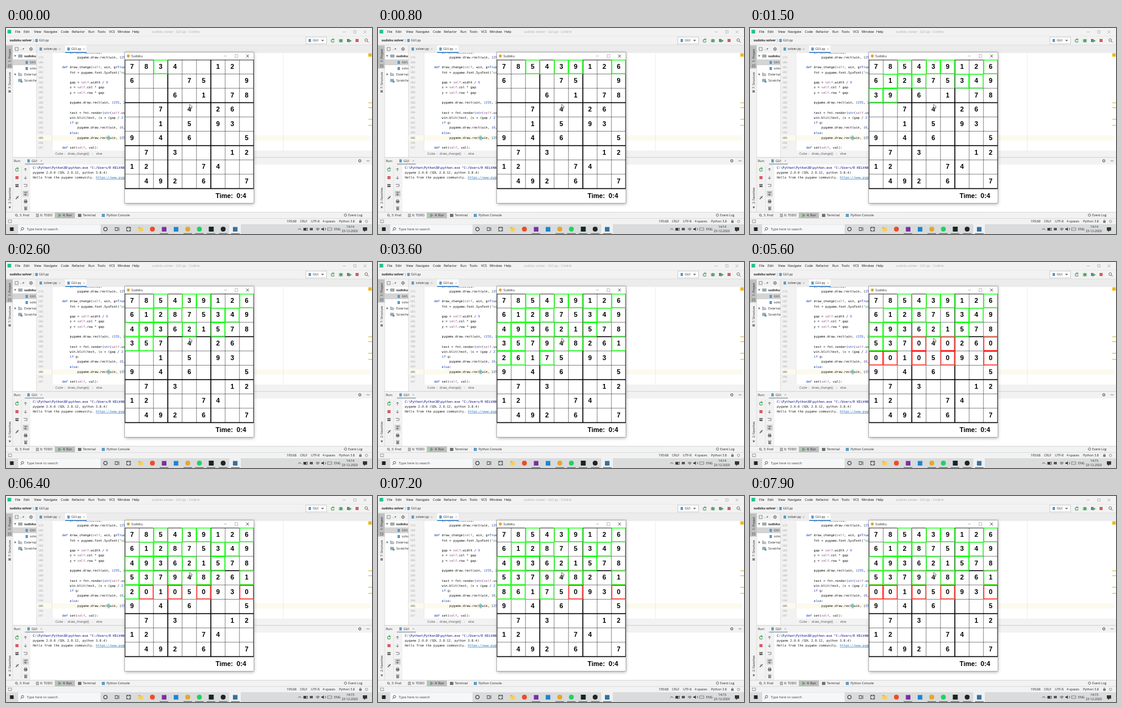
An HTML page with a canvas for the animation above (8000 ms loop, 600 px wide and 338 px high).

```html
<!DOCTYPE html>
<html>
<head>
<meta charset="utf-8">
<style>
html, body { margin: 0; width: 100%; height: 100%; overflow: hidden; background: #f2f2f2; }
canvas { display: block; }
</style>
</head>
<body>
<canvas id="stage" width="600" height="338"></canvas>
<script>
const ctx = document.getElementById('stage').getContext('2d');
const UI = '"Open Sans", sans-serif', MONO = '"DejaVu Sans Mono", monospace', BOARD = '"Liberation Sans", sans-serif';
const STEP = 100, LOOP = 8000, CHAR = 3.13;

// Backtracking solver: record every placement and removal.
const puzzle = [...'780400120600075009000601078007040260001050930904060005070300012120007400049206007'].map(Number);
const moves = [];
const cells = puzzle.slice();

function fits(k, v) {
  const r = k / 9 | 0, c = k % 9;
  return cells.every((n, i) => {
    const y = i / 9 | 0, x = i % 9;
    const peer = y === r || x === c || ((y / 3 | 0) === (r / 3 | 0) && (x / 3 | 0) === (c / 3 | 0));
    return n !== v || !peer;
  });
}

function solve() {
  const k = cells.indexOf(0);
  if (k < 0 || moves.length >= 80) return true;
  for (let v = 1; v <= 9; v++) {
    if (!fits(k, v)) continue;
    cells[k] = v;
    moves.push([k, v]);
    if (solve()) return true;
    cells[k] = 0;
    moves.push([k, 0]);
  }
  return false;
}
solve();

function box(x, y, w, h, color) {
  ctx.fillStyle = color;
  ctx.fillRect(x, y, w, h);
}
function frame(x, y, w, h, color, width = 1) {
  ctx.strokeStyle = color;
  ctx.lineWidth = width;
  ctx.strokeRect(x, y, w, h);
}
function dot(x, y, r, color) {
  ctx.fillStyle = color;
  ctx.beginPath();
  ctx.arc(x, y, r, 0, 7);
  ctx.fill();
}
function ring(x, y, r, color, width = 0.9, start = 0, end = 7) {
  ctx.strokeStyle = color;
  ctx.lineWidth = width;
  ctx.beginPath();
  ctx.arc(x, y, r, start, end);
  ctx.stroke();
}
function path(points, color, width = 0.8) {
  ctx.strokeStyle = color;
  ctx.lineWidth = width;
  ctx.beginPath();
  for (let i = 0; i < points.length; i += 2) ctx.lineTo(points[i], points[i + 1]);
  ctx.stroke();
}
function shape(points, color) {
  ctx.fillStyle = color;
  ctx.beginPath();
  for (let i = 0; i < points.length; i += 2) ctx.lineTo(points[i], points[i + 1]);
  ctx.fill();
}
// y is the middle of the capitals
function text(s, x, y, { size = 5.2, color = '#222', font = UI, weight = 400, align = 'left' } = {}) {
  ctx.font = `${weight} ${size}px ${font}`;
  ctx.fillStyle = color;
  ctx.textAlign = align;
  ctx.fillText(s, x, y + size * 0.36);
}
function upright(s, y) {
  ctx.save();
  ctx.translate(6, y);
  ctx.rotate(-Math.PI / 2);
  text(s, 0, 0, { size: 5, align: 'center' });
  ctx.restore();
}
function cross(x, y, r, color, width) {
  path([x - r, y - r, x + r, y + r], color, width);
  path([x + r, y - r, x - r, y + r], color, width);
}
function play(x, y, color) {
  shape([x - 2.2, y - 3, x + 3, y, x - 2.2, y + 3], color);
}
function rerun(x, y) {
  ring(x, y, 2.4, '#59a869', 1.1, 0, 5);
  shape([x, y - 4.5, x + 3.5, y - 2, x, y - 0.5], '#59a869');
}
function gear(x, y) {
  ring(x, y, 1.8, '#6e6e6e', 1.3);
}
function fileIcon(x, y) {
  box(x - 2, y - 2.5, 4, 5, '#5c9bc4');
}

const code = {
  178: '        if self.selected:',
  179: '            pygame.draw.rect(win, (255, 0',
  181: '    def draw_change(self, win, g=True):',
  182: '        fnt = pygame.font.SysFont("comicsans"',
  184: '        gap = self.width / 9',
  185: '        x = self.col * gap',
  186: '        y = self.row * gap',
  188: '        pygame.draw.rect(win, (255, 255',
  190: '        text = fnt.render(str(self.value)',
  191: '        win.blit(text, (x + (gap / 2 - ',
  192: '        if g:',
  193: '            pygame.draw.rect(win, (0, 255',
  194: '        else:',
  195: '            pygame.draw.rect(win, (255, 0',
  197: '    def set(self, val):'
};
const tokens = /"\w*"?|\b(?:def|if|else|True|str)\b|\bself\b|\b\d+\b|\s+|\w+|./g;

function tokenColor(t) {
  if (t[0] === '"') return '#067d17';
  if (/^(def|if|else|True|str)$/.test(t)) return '#0033b3';
  if (t === 'self') return '#94558d';
  return /^\d/.test(t) ? '#1750eb' : '#111';
}

function drawEditor() {
  box(50, 41, 550, 160, '#fff');
  box(50, 41, 25, 160, '#f2f2f2');
  box(50, 176, 547, 8.5, '#fcfaed');
  path([75.5, 41, 75.5, 201], '#dcdcdc', 0.6);
  path([454.5, 41, 454.5, 201], '#e4e4e4', 0.6);
  box(594, 41.5, 5.5, 5.5, '#f0b81c');
  for (const y of [122, 130, 149, 159]) box(594, y, 6, 1.4, '#e8c35a');
  box(166.5, 176.3, 3.3, 8, '#93d9d9');
  for (let n = 178; n <= 197; n++) {
    const y = 48 + (n - 179) * 8.25;
    text(n, 61, y, { size: 4.6, color: n === 195 ? '#555' : '#aaa', font: MONO, align: 'right' });
    let x = 79.5;
    for (const t of (code[n] || '').match(tokens) || []) {
      text(t, x, y, { font: MONO, color: tokenColor(t) });
      x += t.length * CHAR;
    }
  }
  box(50, 201, 550, 11, '#f2f2f2');
  text('Cube', 81, 206.5, { color: '#555' });
  text('›', 96, 206.5, { color: '#999' });
  text('draw_change()', 101, 206.5, { color: '#555' });
  text('›', 141, 206.5, { color: '#999' });
  text('else', 148, 206.5, { color: '#555' });
}

function drawHeader() {
  box(0, 0, 600, 41, '#f2f2f2');
  box(2.5, 3, 6, 6, '#21c48a');
  const menu = { File: 15, Edit: 29, View: 46, Navigate: 62, Code: 90, Refactor: 108, Run: 135, Tools: 150, VCS: 169, Window: 183, Help: 207 };
  for (const item in menu) text(item, menu[item], 6.5, { size: 5.4, color: '#111' });
  text('sudoku solver - GUI.py - Coldrix', 239, 6.5, { size: 5.4, color: '#aaa' });
  path([552, 6.5, 557, 6.5], '#aaa', 0.7);
  frame(570, 4.5, 4, 4, '#aaa', 0.7);
  cross(588.5, 6.5, 2.2, '#999', 0.7);

  text('sudoku solver', 6, 20.5, { size: 5.2, weight: 700 });
  path([44, 18, 46, 20.5, 44, 23], '#999', 0.7);
  fileIcon(50, 20.5);
  text('GUI.py', 54, 20.5);
  box(491.5, 15, 34, 11, '#fff');
  frame(491.5, 15, 34, 11, '#c4c4c4', 0.8);
  fileIcon(498, 20.5);
  text('GUI', 503, 20.5);
  shape([516.5, 19.5, 521.5, 19.5, 519, 22], '#666');
  rerun(535.5, 21);
  dot(549, 20.8, 2.8, '#59a869');
  path([545.5, 19, 552.5, 23], '#59a869');
  path([552.5, 19, 545.5, 23], '#59a869');
  box(559, 18, 4, 5, '#777');
  play(564, 21, '#59a869');
  box(573, 18, 5, 5, '#db5860');
  ring(590.5, 19.8, 2.2, '#666');
  path([592.1, 21.4, 594.3, 23.8], '#666', 1);
  path([0, 13.5, 600, 13.5], '#e2e2e2', 0.6);
  path([0, 28, 600, 28], '#cfcfcf', 0.8);

  box(50, 28.5, 550, 12.5, '#ececec');
  box(97, 28.5, 35, 12.5, '#fff');
  box(97, 39.3, 35, 1.7, '#4083c9');
  fileIcon(57, 34.5);
  text('solver.py', 62, 34.5);
  cross(88, 34.5, 1.3, '#999', 0.6);
  fileIcon(102.5, 34.5);
  text('GUI.py', 107, 34.5);
  cross(128, 34.5, 1.3, '#999', 0.6);
}

function drawProject() {
  box(11, 41, 39, 171, '#fff');
  box(11, 51.5, 39, 9.5, '#d4d4d4');
  shape([13, 44.5, 17, 44.5, 15, 47.5], '#777');
  box(20, 43.5, 7, 5, '#9aa7b0');
  text('sudoku solver', 30, 46.5, { weight: 700 });
  fileIcon(34, 56.5);
  text('GUI.py', 39, 56.5);
  fileIcon(34, 66.5);
  text('solver.py', 39, 66.5);
  shape([14, 74, 17, 76, 14, 78], '#777');
  for (let i = 0; i < 3; i++) box(20 + i * 2.3, 73 + i, 1.6, 6 - i, '#9aa7b0');
  text('External Libraries', 30, 76.5);
  box(20, 83.5, 6, 5, '#9aa7b0');
  dot(25.5, 88, 1.8, '#40a0cc');
  text('Scratches', 30, 86.5);
}

function drawSides() {
  box(0, 28.5, 11, 274, '#f2f2f2');
  box(0, 28.5, 11, 38, '#bfbfbf');
  upright('1: Project', 45);
  frame(4, 60.5, 4, 3.5, '#666', 0.8);
  upright('7: Structure', 86);
  box(4, 102, 4, 4, '#888');
  upright('2: Favorites', 275);
  text('★', 3.5, 294, { size: 6, color: '#555' });
  path([11, 28, 11, 302], '#d2d2d2', 0.7);
  box(11.5, 28.5, 38.5, 12.5, '#f2f2f2');
  frame(15, 32, 5, 5, '#777', 0.8);
  text('...▾', 23, 34, { color: '#555' });
  ring(41, 34.5, 2.3, '#6e6e6e');
  path([38, 34.5, 44, 34.5], '#6e6e6e', 0.6);
  path([41, 31.5, 41, 37.5], '#6e6e6e', 0.6);
  path([50, 28, 50, 212], '#d2d2d2', 0.7);
}

function drawRunPanel() {
  box(11.5, 212, 588.5, 90, '#f2f2f2');
  box(40, 224, 560, 78, '#fff');
  path([11, 212.3, 600, 212.3], '#c9c9c9', 0.8);
  text('Run:', 13, 218);
  fileIcon(37, 218);
  text('GUI', 42, 218);
  cross(58, 218, 1.4, '#999', 0.6);
  box(31, 222.5, 31, 1.6, '#9aa7b0');
  gear(580, 218);
  path([591, 218, 596, 218], '#6e6e6e');
  rerun(18, 232.5);
  box(15.5, 243, 5, 5, '#db5860');
  box(15.5, 256, 2.2, 2.2, '#555');
  box(18.3, 256, 2.2, 2.2, '#555');
  box(15.5, 258.8, 5, 2.2, '#555');
  path([20.5, 276, 16, 280.8], '#666', 1.6);
  path([17, 276.5, 20, 279.5], '#666', 0.8);
  path([25.5, 226, 25.5, 300], '#d8d8d8', 0.6);
  path([32, 235, 32, 230, 30, 232.2, 32, 230, 34, 232.2], '#666');
  path([32, 243, 32, 248, 30, 245.8, 32, 248, 34, 245.8], '#666');
  path([29, 256.5, 34.5, 256.5, 34.5, 260, 30, 260], '#6e6e6e');
  box(27.5, 267, 9.5, 9.5, '#d0d0d0');
  path([29.5, 269.5, 35, 269.5], '#555');
  path([32, 270.5, 32, 274.5, 30, 272.5, 32, 274.5, 34, 272.5], '#555');
  box(29.5, 283, 5.5, 3.5, '#6e6e6e');
  frame(30.7, 281.5, 3, 6, '#6e6e6e', 0.6);
  box(30, 294, 4.5, 5, '#888');
  box(29.3, 292.7, 6, 0.8, '#888');
  const mono = { font: MONO, size: 5.2 };
  text('C:\\Python\\Python38\\python.exe "C:/Users/R KELVAN', 44, 228.7, { ...mono, color: '#000080' });
  text('pygame 2.0.0 (SDL 2.0.12, python 3.8.4)', 44, 236.8, mono);
  text('Hello from the pygame community. ', 44, 245.1, mono);
  text('https://www.pygame.org', 44 + 33 * CHAR, 245.1, { ...mono, color: '#2470b3' });
  path([44 + 33 * CHAR, 248.2, 196, 248.2], '#2470b3', 0.6);
}

function drawStatus() {
  box(0, 302, 600, 20, '#f2f2f2');
  path([0, 302.3, 600, 302.3], '#cfcfcf', 0.8);
  box(80, 302.8, 33, 9.5, '#bfbfbf');
  ring(17, 307, 1.6, '#666');
  path([18.2, 308.2, 20, 310], '#666');
  text('3: Find', 22, 307.5);
  for (let i = 0; i < 3; i++) box(49, 305 + i * 2, 5, 0.9, '#666');
  text('6: TODO', 56, 307.5);
  play(88, 307.5, '#59a869');
  text('4: Run', 93, 307.5);
  box(118, 305, 5.5, 5, '#6e6e6e');
  text('Terminal', 126, 307.5);
  box(157, 305, 5, 5, '#5c9bc4');
  text('Python Console', 165, 307.5);
  ring(556.5, 307, 2, '#666');
  text('Event Log', 561, 307.5);
  path([0, 312.5, 600, 312.5], '#d5d5d5', 0.7);
  frame(4, 315, 5, 4.5, '#888', 0.8);
  const info = { '195:68': 460, CRLF: 482, 'UTF-8': 500, '4 spaces': 519, 'Python 3.8': 546 };
  for (const s in info) text(s, info[s], 317.5);
  box(579, 316.5, 4, 3, '#6e6e6e');
  ring(581, 316.3, 1.3, '#6e6e6e', 0.7);
  ring(591, 317.3, 2, '#888', 0.8);
}

function drawTaskbar(minute) {
  box(0, 322, 600, 16, '#d9dbdc');
  box(6.5, 327, 6, 6, '#222');
  box(20, 322.5, 135, 15.5, '#f6f7f8');
  ring(27, 329.3, 2, '#444', 0.8);
  path([25.6, 330.8, 23.8, 333], '#444');
  text('Type here to search', 34, 330.1, { size: 5.6, color: '#444' });
  ring(163, 330, 3, '#222', 1);
  frame(179, 327.5, 4, 5, '#333', 0.8);
  path([185, 327, 185, 333], '#333');
  box(366, 322, 19, 16, '#f0f1f2');
  box(197.5, 326.5, 7, 7, '#444');
  dot(201, 330, 2.6, '#f4f4f4');
  path([201, 328, 201, 330, 203, 331], '#555', 0.6);
  box(217, 327, 3.5, 2, '#d99a1c');
  box(217, 328, 7.5, 5.5, '#f6cf57');
  dot(240, 330, 4, '#ee4b28');
  box(255.5, 326.5, 7.5, 7.5, '#7d2ea5');
  box(275, 326.5, 7.5, 7.5, '#1c86cf');
  dot(298, 330, 4, '#e3a72b');
  dot(317, 330, 4, '#1ed35f');
  box(332.5, 326, 8, 8, '#15251f');
  dot(356, 330, 4, '#222');
  box(372, 326.5, 7.5, 7.5, '#35719f');
  for (const x of [259, 298, 317, 336, 356, 376]) box(x - 7, 336.7, 14, 1.3, '#3b8bc2');
  path([479, 331.3, 481.5, 328.8, 484, 331.3], '#333');
  frame(488, 328.5, 6, 3.5, '#333', 0.8);
  box(488, 328.5, 4, 3.5, '#333');
  box(498, 328, 5, 4, '#555');
  for (let r = 1.5; r < 5; r += 1.5) ring(511, 333, r, '#333', 0.7, -2.35, -0.78);
  shape([517, 329, 519, 329, 521, 327, 521, 333, 519, 331, 517, 331], '#333');
  path([523, 328, 524, 330, 523, 332], '#333', 0.7);
  frame(527, 328, 7, 4, '#666', 0.7);
  text('ENG', 538, 330.3);
  text('14:' + minute, 564.5, 326.2, { size: 5, align: 'center' });
  text('23-12-2020', 563.5, 333.6, { size: 5, align: 'center' });
  box(585, 327, 7, 5.5, '#333');
  shape([587, 332, 590, 332, 587, 334.5], '#333');
}

// Board coordinates: 540 wide, 600 high, 60 per cell
function digit(k, v) {
  text(v, k % 9 * 60 + 30, (k / 9 | 0) * 60 + 28, { size: 27.5, color: '#000', font: BOARD, weight: 700, align: 'center' });
}

function drawWindow(count) {
  ctx.save();
  ctx.shadowColor = 'rgba(0,0,0,.35)';
  ctx.shadowBlur = 5;
  ctx.shadowOffsetY = 1;
  box(194.5, 40, 212, 247.5, '#fff');
  ctx.restore();
  frame(194.3, 39.8, 212.3, 247.6, '#888', 0.6);
  dot(200.5, 46, 2.4, '#d9a52b');
  text('Sudoku', 205.5, 46, { size: 5.3 });
  path([357.5, 46, 362, 46], '#999', 0.7);
  frame(375.5, 43.7, 4.5, 4.5, '#aaa', 0.7);
  cross(396, 46, 2.3, '#222', 0.7);

  ctx.save();
  ctx.translate(194.8, 52);
  ctx.scale(0.3915, 0.3915);
  ctx.beginPath();
  ctx.rect(0, 0, 540, 600);
  ctx.clip();
  for (let i = 0; i <= 9; i++) {
    const width = i % 3 ? 1.2 : 4;
    path([0, i * 60, 540, i * 60], '#000', width);
    path([i * 60, 0, i * 60, 540], '#000', width);
  }
  puzzle.forEach((v, k) => v && digit(k, v));
  for (const [k, v] of moves.slice(0, count)) {
    const x = k % 9 * 60, y = (k / 9 | 0) * 60;
    box(x, y, 60, 60, '#fff');
    digit(k, v);
    frame(x + 1.5, y + 1.5, 57, 57, v ? '#0f0' : '#f00', 3);
  }
  text('Time:  0:4', 380, 571, { size: 27.5, color: '#000', font: BOARD, weight: 700 });
  ctx.restore();

  ctx.beginPath();
  ctx.moveTo(301, 125);
  for (const [x, y] of [[301, 131.5], [302.5, 130.2], [303.6, 132.6], [304.6, 132.1], [303.6, 129.8], [305.5, 129.6]]) ctx.lineTo(x, y);
  ctx.closePath();
  ctx.fillStyle = '#fff';
  ctx.fill();
  ctx.strokeStyle = '#222';
  ctx.lineWidth = 0.6;
  ctx.stroke();
}

let shown = -1;
function render(now) {
  const tick = Math.floor(now % LOOP / STEP);
  if (tick !== shown) {
    shown = tick;
    drawProject();
    drawEditor();
    drawHeader();
    drawSides();
    drawRunPanel();
    drawStatus();
    drawTaskbar(tick < 41 ? 14 : 15);
    // the solver runs slightly slower than the ticks and slips by one
    drawWindow(tick < 8 ? tick + 1 : tick);
  }
  requestAnimationFrame(render);
}
requestAnimationFrame(render);
</script>
</body>
</html>
```
